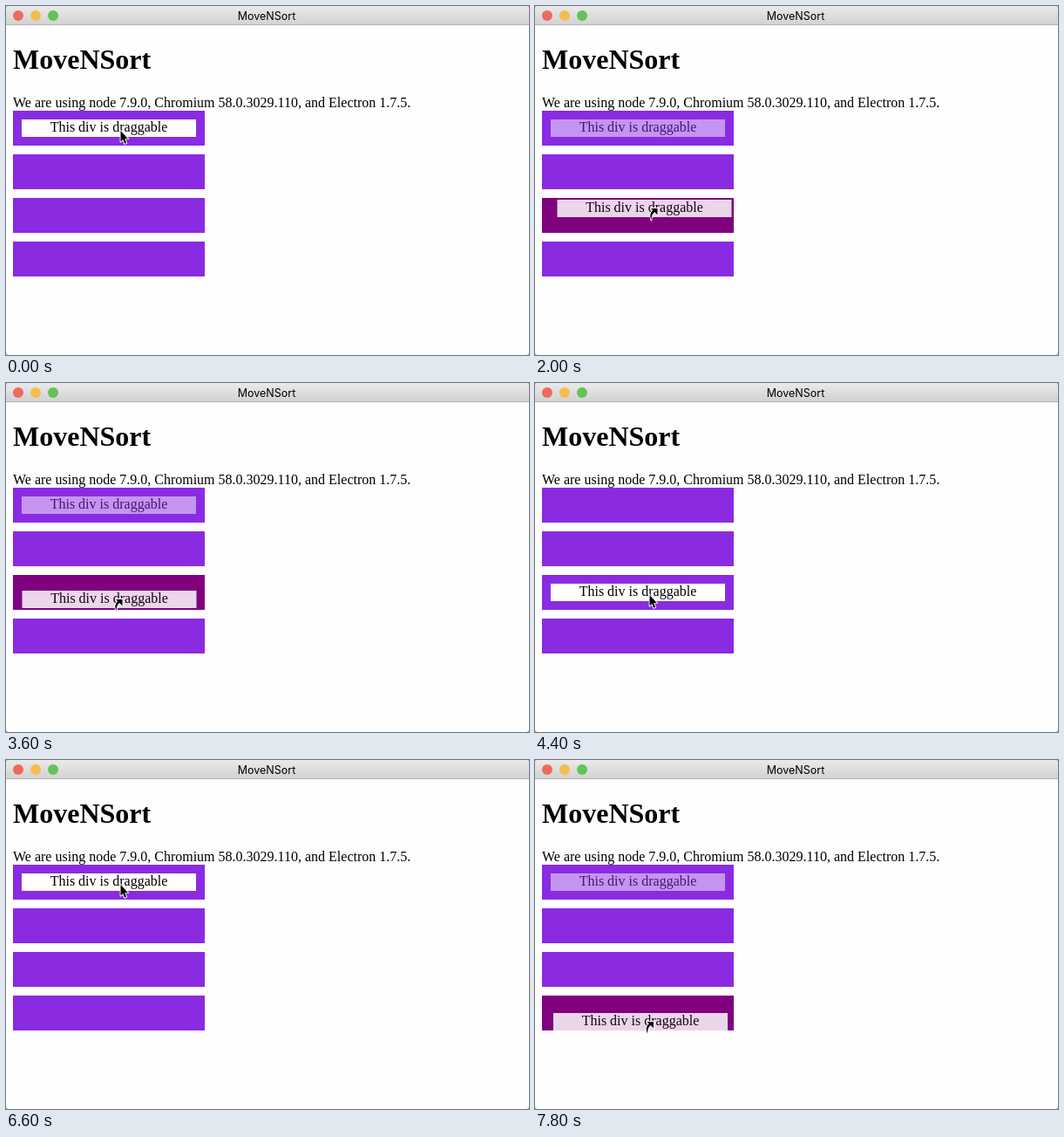
An HTML page for the animation above (8 s loop, 600x400 px).

```html
<!DOCTYPE html>
<html lang="en">
<head>
<meta charset="utf-8">
<title>MoveNSort</title>
<style>
html, body { margin: 0; width: 100%; height: 100%; overflow: hidden; background: #b4b4b4; }
#win { position: absolute; width: 600px; height: 400px; overflow: hidden; border-radius: 4px;
  background: #fefefe; color: #000; font: 16px/18px "Liberation Serif", Times, serif; }
#win > * { position: absolute; white-space: nowrap; margin: 0; }
#bar { left: 0; top: 0; width: 600px; height: 21px; border-bottom: 1px solid #b3b3b3;
  background: linear-gradient(#eaeaea, #d2d2d2); text-align: center;
  font: 12.5px/23px Inter, Roboto, sans-serif; text-indent: -2px; }
#bar i { position: absolute; left: 8px; top: 5px; width: 12px; height: 12px; border-radius: 50%;
  background: #ee6a5f; box-shadow: 20px 0 #f5bd4f, 40px 0 #61c454; }
h1 { left: 8px; top: 43px; font-size: 32px; line-height: 37px; }
p { left: 8px; top: 102px; }
.slot { left: 8px; width: 220px; height: 40px; background: blueviolet; }
.slot.over { background: purple; }
.item { left: 18px; top: 130px; width: 200px; height: 20px; background: #fff; text-align: center; }
#ghost { opacity: .84; }
svg { left: 131px; top: 142px; overflow: visible; }
path { stroke: #fff; stroke-width: 1.8; paint-order: stroke; stroke-linejoin: round; }
</style>
</head>
<body>
<div id="win">
  <div id="bar"><i></i>MoveNSort</div>
  <h1>MoveNSort</h1>
  <p>We are using node 7.9.0, Chromium 58.0.3029.110, and Electron 1.7.5.</p>
  <div class="slot"></div>
  <div class="slot"></div>
  <div class="slot"></div>
  <div class="slot"></div>
  <div class="item" id="item">This div is draggable</div>
  <div class="item" id="ghost">This div is draggable</div>
  <svg id="cursor" width="1" height="1"><path id="shape"/></svg>
</div>
<script>
const LOOP = 8000, STEP = 200, PITCH = 50;
const ARROW = "M.5 1V13.5L3.2 11 5.2 15.8 7.2 15 5.2 10.2H9Z";
const ALIAS = "M2-2H-5.5L-3.3.2C-6.5 3-7 7-5 11.5-5 7.5-4 4.5-1.4 2.1L2 5.5Z";

// where the pointer has moved to: time, x, y from its resting place
const stops = [
  [800, 0, 0], [1400, 12.5, 42], [2600, 2.5, 142], [3600, .5, 108], [4000, 0, 100],
  [4600, 0, 100], [5200, -.5, 22.5], [5600, 0, 0], [6800, 0, 0], [7800, 3, 160]
];
// start, end, slot dropped on
const drags = [[800, 4000, 2], [4600, 6000, 0], [6800, LOOP, 3]];

const $ = id => document.getElementById(id);
const slots = [...document.querySelectorAll(".slot")];
const move = (el, x, y) => el.style.transform = `translate(${x}px,${y}px)`;
slots.forEach((s, i) => s.style.top = 120 + PITCH * i + "px");

function offset(t) {
  const i = Math.max(1, stops.findIndex(s => s[0] >= t));
  const [t0, x0, y0] = stops[i - 1], [t1, x1, y1] = stops[i];
  const u = Math.max(0, (t - t0) / (t1 - t0));
  return [x0 + (x1 - x0) * u, y0 + (y1 - y0) * u];
}

function draw(t) {
  const [x, y] = offset(t);
  const drag = drags.some(([from, to]) => t >= from && t < to);
  const home = drags.reduce((slot, [, to, next]) => t >= to ? next : slot, 0);

  slots.forEach((s, i) => {
    const depth = y + 22 - PITCH * i;
    s.classList.toggle("over", drag && i !== home && depth >= 0 && depth < 40);
  });
  move($("item"), 0, PITCH * home);
  move($("ghost"), x, y);
  move($("cursor"), x, y);
  $("item").style.opacity = drag ? .5 : 1;
  $("ghost").style.display = drag ? "" : "none";
  $("shape").setAttribute("d", drag ? ALIAS : ARROW);
}

function tick(now) {
  draw(Math.floor(now % LOOP / STEP) * STEP);
  requestAnimationFrame(tick);
}
draw(0);
requestAnimationFrame(tick);
</script>
</body>
</html>
```
